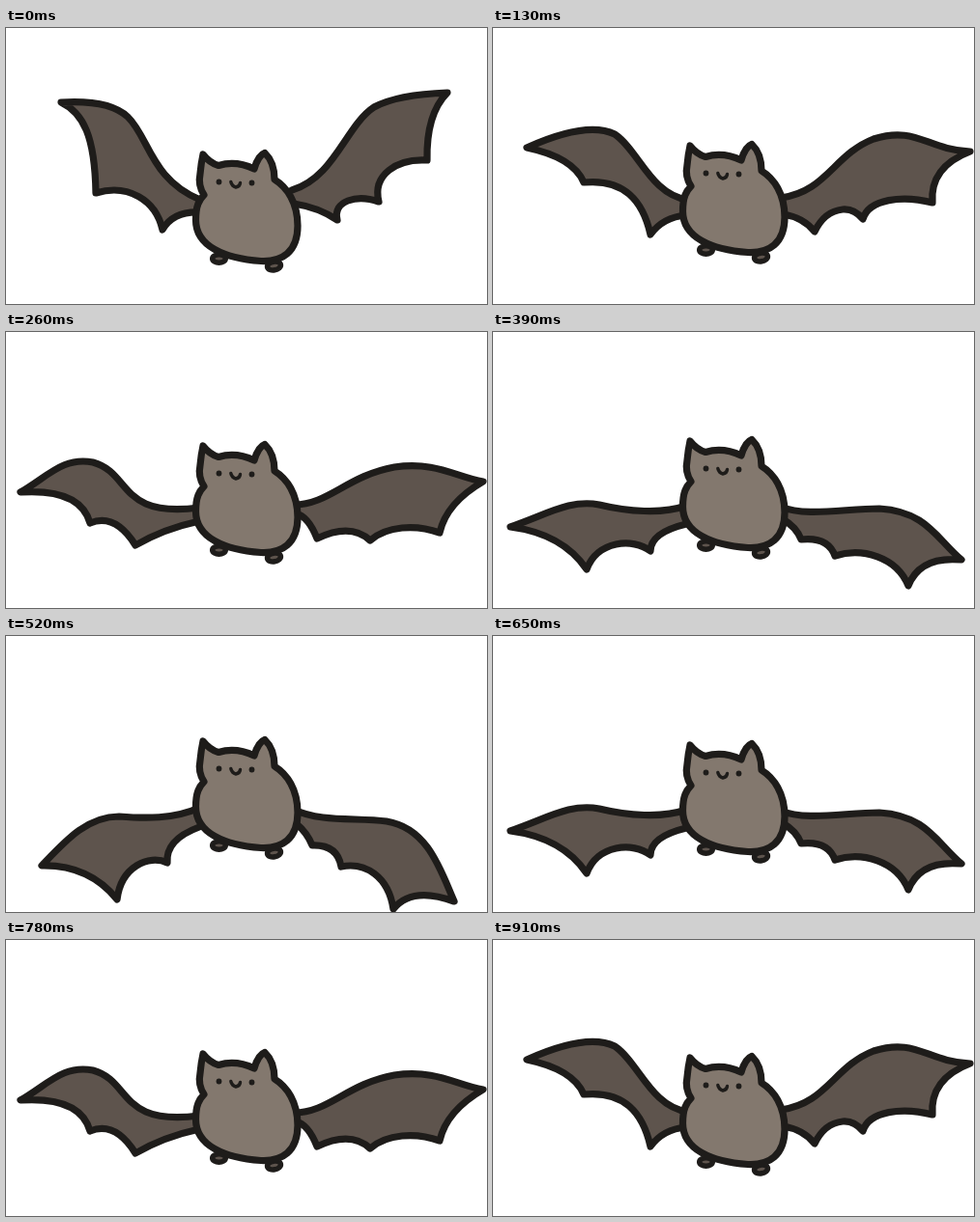
An HTML page that plays this animation: 498 px wide and 286 px high, repeating every 1040 ms.

```html
<!DOCTYPE html>
<html lang="en">
<head>
<meta charset="utf-8">
<title>Flapping bat</title>
<style>
  html, body { margin: 0; width: 100%; height: 100%; overflow: hidden; background: #fff; }
  svg { display: block; width: 498px; height: 286px; }
  .ink { stroke: #1e1c1a; stroke-width: 7.2; stroke-linejoin: round; stroke-linecap: round; }
  .foot { stroke-width: 5.5; }
  .dark { fill: #5e544d; }
  .light { fill: #83786e; }
</style>
</head>
<body>
<svg viewBox="0 0 498 286">
  <path id="left" class="ink dark"/>
  <path id="right" class="ink dark"/>
  <g id="body">
    <ellipse class="ink foot dark" cx="220.500" cy="239" rx="6.800" ry="4.200"/>
    <ellipse class="ink foot dark" cx="277.500" cy="246.500" rx="7" ry="4.400" transform="rotate(-10 277.500 246.500)"/>
    <path class="ink light" d="M204 131Q211 140 220 142.500Q238 137 257 146Q261 132 268 129.500Q278 139 278 157C291 165 302 181 302 205C302 232 286 242.500 264 241.500C226 239 196.500 226 196.500 199C196.500 184 200 178 205 173Q198.500 163 201 151Q202 140 204 131Z"/>
    <circle cx="220.500" cy="159.500" r="2.900" fill="#1e1c1a"/>
    <circle cx="254.500" cy="160.500" r="2.900" fill="#1e1c1a"/>
    <path d="M232.800 159.500Q234 164 238 165Q242 164.500 242.500 160.500" class="ink" fill="none" style="stroke-width:3.400"/>
  </g>
</svg>
<script>
  // Wing poses from fully raised to fully lowered, with the body's vertical shift.
  const poses = [
    {
      lift: 0,
      left: "M201 178C150 157 148 113 126 92Q107 74 57 77C80 88 92 112 93 171C126 161 155 178 162 209Q173 190 200 191",
      right: "M296 168C340 155 352 101 381 82Q405 69 457 67Q435 89 436 137C405 135 379 152 386 180C363 172 338 179 343 199Q324 186 298 182"
    },
    {
      lift: -9,
      left: "M201 178C163 172 151 127 126 110Q97 96 35 124Q83 134 94 160C135 156 155 178 163 214Q176 196 200 194",
      right: "M298 176C345 170 353 131 394 115C438 101 449 126 494 128Q452 144 455 181C424 173 389 177 383 198Q374 187 362 188Q343 190 333 211Q321 196 300 193"
    },
    {
      lift: -13,
      left: "M200 182C116 193 130 146 90 135C59 129 43 150 15 166Q77 162 87 198C109 189 124 205 134 221Q163 204 200 196",
      right: "M298 179C334 179 353 149 402 140C446 134 465 150 494 155Q456 177 449 208C424 199 394 201 377 216C362 202 343 204 322 214Q313 191 300 188"
    },
    {
      lift: -18,
      left: "M200 180C175 189 139 186 110 179C80 173 56 189 18 202Q72 209 97 246C108 216 145 213 163 227Q163 208 200 199",
      right: "M298 181C324 192 364 183 400 183C449 186 459 214 485 236Q442 232 430 263C418 233 382 223 354 232Q347 212 319 215Q314 202 300 194"
    },
    {
      lift: -22,
      left: "M200 178C174 190 143 189 117 187C83 187 60 214 37 238Q86 237 115 273C119 239 148 226 167 235Q165 211 200 198",
      right: "M298 180C326 193 362 188 394 192C437 199 450 243 464 275Q420 259 401 283C396 249 372 234 347 239Q343 216 317 217Q312 204 300 194"
    }
  ];
  const STEP = 130, CYCLE = 2 * (poses.length - 1);
  const el = id => document.getElementById(id);
  const left = el("left"), right = el("right"), body = el("body");
  const start = performance.now();

  function draw(now) {
    const step = Math.floor(Math.max(0, now - start) / STEP) % CYCLE;
    const pose = poses[Math.min(step, CYCLE - step)];
    left.setAttribute("d", pose.left);
    right.setAttribute("d", pose.right);
    body.setAttribute("transform", `translate(0 ${pose.lift})`);
    requestAnimationFrame(draw);
  }
  draw(start);
</script>
</body>
</html>
```
